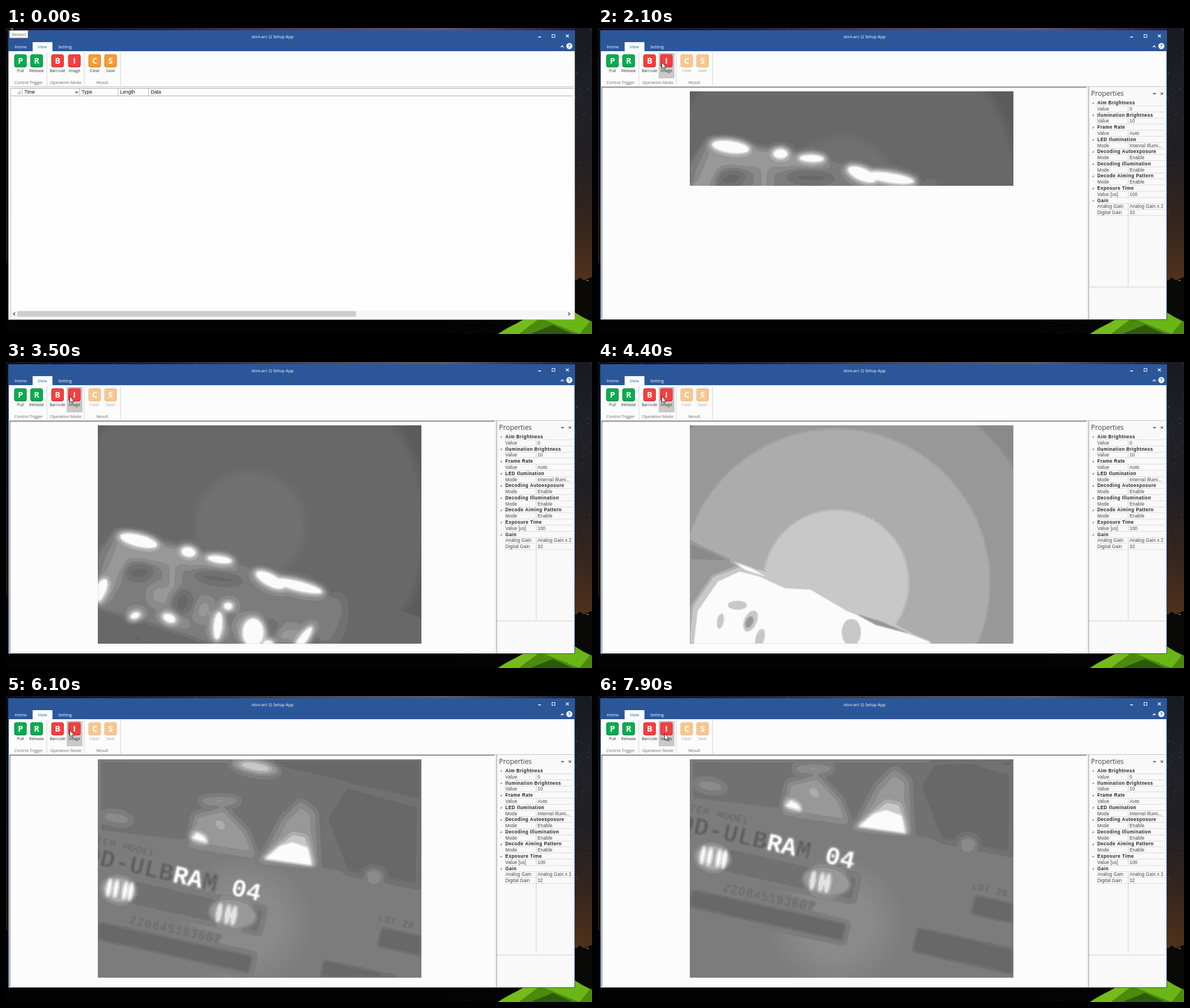
Animation of 1034 by 541 pixels, one loop 8000 ms. Source, as an HTML page with a canvas:

```html
<!DOCTYPE html>
<html lang="en">
<head>
<meta charset="utf-8">
<title>Camera setup</title>
<style>
html, body { margin: 0; width: 100%; height: 100%; overflow: hidden; background: #000; }
canvas { display: block; width: 1034px; height: 541px; }
</style>
</head>
<body>
<canvas id="stage" width="1034" height="541"></canvas>
<script>
const LOOP = 8000;
const UI = '"Open Sans", "Noto Sans", sans-serif';
const ARIAL = '"Liberation Sans", Arial, sans-serif';
const MONO = '"Liberation Mono", "DejaVu Sans Mono", monospace';
const BLUE = '#2b579a';
const VIEW = { x: 162, y: 112, w: 571, h: 386 };

const makeCanvas = (w, h) => Object.assign(document.createElement('canvas'), { width: w, height: h });
const c = document.getElementById('stage').getContext('2d');
const grey = v => `rgb(${v},${v},${v})`;

/* ---------- helpers ---------- */

function random(seed) {
  return () => (seed = (seed * 16807) % 2147483647) / 2147483647;
}

// Point at time t on straight legs between [time, x, y] keys.
function along(keys, t) {
  const n = keys.findIndex(k => k[0] > t);
  if (n === 0) return keys[0].slice(1);
  if (n < 0) return keys[keys.length - 1].slice(1);
  const [t0, x0, y0] = keys[n - 1], [t1, x1, y1] = keys[n];
  const k = (t - t0) / (t1 - t0);
  return [x0 + (x1 - x0) * k, y0 + (y1 - y0) * k];
}

function rect(x, y, w, h, color) {
  c.fillStyle = color;
  c.fillRect(x, y, w, h);
}

function rounded(x, y, w, h, r, color) {
  c.beginPath();
  c.roundRect(x, y, w, h, r);
  c.fillStyle = color;
  c.fill();
}

function text(s, x, y, size, color, font = UI, align = 'left', weight = '', gap = 0) {
  c.font = `${weight} ${size}px ${font}`;
  c.fillStyle = color;
  c.textAlign = align;
  c.letterSpacing = gap + 'px';
  c.fillText(s, x, y);
}

function trace(points) {
  c.beginPath();
  points.forEach(([x, y]) => c.lineTo(x, y));
}

function fill(points, color) {
  trace(points);
  c.fillStyle = color;
  c.fill();
}

function line(points, color, width = 1) {
  trace(points);
  c.strokeStyle = color;
  c.lineWidth = width;
  c.stroke();
}

function cross(x, y, r, color) {
  line([[x - r, y - r], [x + r, y + r]], color, 1.1);
  line([[x + r, y - r], [x - r, y + r]], color, 1.1);
}

function ramp(x, y, colors) {
  const r = c.createLinearGradient(0, 0, x, y);
  colors.forEach((color, i) => r.addColorStop(i / (colors.length - 1), color));
  return r;
}

/* ---------- desktop behind the window ---------- */

function drawDesktop() {
  const rnd = random(41);
  rect(0, 0, 1034, 541, '#030303');
  rect(0, 0, 1034, 5, ramp(1034, 0, ['#0b0e15', '#20232c', '#484856', '#5c5b69', '#15181f']));
  rect(0, 5, 4, 410, ramp(0, 415, ['#0b0e15', '#15151b', '#21160f']));
  rect(1004, 0, 30, 446, ramp(0, 446, ['#171a21', '#1f2026', '#211f23', '#33241d', '#51311a']));
  for (let i = 0; i < 160; i++) {
    const side = i % 2;
    rect(side ? 1004 + rnd() * 30 : rnd() * 1034, rnd() * (side ? 330 : 4), 1, 1, grey(50 + rnd() * 70 | 0));
  }

  fill([[1004, 449], [1012, 441], [1020, 446], [1034, 440], [1034, 541], [1004, 541]], '#0a0906');
  line([[1024, 445], [1026, 447], [1028, 446]], '#c8c8c0');
  for (let i = 0; i < 60; i++) rect(783 + rnd() * 100, 517 + rnd() * 24, 2, 1, '#111808');

  c.beginPath();
  c.moveTo(868, 541);
  c.quadraticCurveTo(900, 517, 950, 509);
  c.quadraticCurveTo(990, 496, 1034, 519);
  c.lineTo(1034, 541);
  c.fillStyle = ramp(0, 541, ['#4c8a0c', '#4c8a0c']);
  c.fill();
  fill([[868, 541], [912, 516], [938, 516], [905, 541]], '#76bb1c');
  fill([[950, 516], [1004, 503], [1030, 519], [1012, 541]], '#6cb517');
  fill([[925, 541], [965, 525], [1000, 541]], '#2d5a08');
}

/* ---------- window ---------- */

function ribbonButton(letter, label, x, color, edge, ink = '#333') {
  rounded(x - 11, 46.5, 22, 23, 4, edge);
  rounded(x - 10, 47.2, 20, 20.8, 3.5, color);
  text(letter, x, 62.8, 14.5, '#fff', UI, 'center', 'bold');
  text(label, x, 77.5, 7.2, ink, UI, 'center');
}

function drawWindow(imageMode, pressed) {
  rect(4, 4, 1000, 512, pressed ? BLUE : '#b4b4b4');
  rect(5, 41, 998, 474, '#f6f6f6');
  rect(4, 4, 1000, 37, BLUE);
  text('dovi-arc Q Setup App', 470.5, 17.5, 7.6, '#fff', UI, 'center');
  rect(939, 15, 5, 1.5, '#fff');
  c.strokeStyle = '#fff';
  c.lineWidth = 1;
  c.strokeRect(963.5, 11.5, 5, 5);
  cross(990.5, 14, 2.5, '#fff');
  line([[979, 34], [981.5, 31.5], [984, 34]], '#fff', 1.4);
  rounded(988.6, 26.6, 10.8, 10.8, 5.4, '#fff');
  text('?', 994, 35, 8.5, BLUE, UI, 'center', 'bold');

  rect(47, 25, 35, 17, '#fcfcfc');
  text('Home', 15.5, 36, 7.5, '#fff');
  text('View', 56, 36, 7.5, '#2464b4');
  text('Setting', 92, 36, 7.5, '#fff');

  rect(6, 41, 996, 62, '#fcfcfc');
  rect(6, 103, 996, 1, '#c4c4c4');
  for (const x of [72, 138, 202]) rect(x - .5, 43, 1, 59, '#d2d2d2');
  if (pressed) rect(107, 44, 28, 45, '#c9c9c9');
  const green = ['#02ad50', '#058442'], red = ['#fb3c3e', '#c83032'];
  const orange = imageMode ? ['#f8c68f', '#e9bb88', '#a5a5a5'] : ['#fd9a2b', '#cf8025'];
  ribbonButton('P', 'Pull', 25.5, ...green);
  ribbonButton('R', 'Release', 54, ...green);
  ribbonButton('B', 'Barcode', 91, ...red);
  ribbonButton('I', 'Image', 120.7, ...red);
  ribbonButton('C', 'Clear', 156.5, ...orange);
  ribbonButton('S', 'Save', 184.5, ...orange);
  text('Control Trigger', 40, 98.5, 7.2, '#666', UI, 'center');
  text('Operation Mode', 105.5, 98.5, 7.2, '#666', UI, 'center');
  text('Result', 170, 98.5, 7.2, '#666', UI, 'center');
}

function drawTable() {
  rect(8, 106, 993, 406, '#fdfdfd');
  rect(8, 106, 993, 1, '#a6a6a6');
  rect(8, 106, 1, 405, '#c8c8c8');
  rect(8, 119.5, 992, 1, '#a9a9a9');
  const columns = { Time: 28, Type: 129, Length: 197, Data: 251 };
  for (const [name, x] of Object.entries(columns)) {
    rect(x, 107, 1, 13, '#bdbdbd');
    text(name, x + 4.5, 116, 8.5, '#111', ARIAL);
  }
  fill([[26, 110], [26, 117], [19, 117]], '#c6c6c6');
  fill([[121, 112.5], [128, 112.5], [124.5, 116]], '#707070');
  rect(9, 500, 991, 11, '#f5f5f5');
  rect(20, 500.5, 597.5, 10, '#cdcdcd');
  line([[16, 503], [13, 505.5], [16, 508]], '#444', 1.3);
  line([[992, 503], [995, 505.5], [992, 508]], '#444', 1.3);
}

const PROPERTIES = [
  'Aim Brightness', 'Value|0', 'Ilumination Brightness', 'Value|10',
  'Frame Rate', 'Value|Auto', 'LED Ilumination', 'Mode|Internal Illumi...',
  'Decoding Autoexposure', 'Mode|Enable', 'Decoding Illumination', 'Mode|Enable',
  'Decode Aiming Pattern', 'Mode|Enable', 'Exposure Time', 'Value [us]|100',
  'Gain', 'Analog Gain|Analog Gain x 2', 'Digital Gain|32'
];

function drawImageMode() {
  rect(6, 104, 857, 411, '#fcfcfc');
  rect(6, 104, 856, 1.5, '#858585');
  rect(6, 104, 1.5, 410, '#858585');
  rect(862, 104, 4, 411, '#f2f2f2');
  rect(865, 104, 1.5, 411, '#b5b5b5');
  rect(867, 104, 135, 411, '#f9f9f9');
  text('Properties', 870, 120, 12, '#444');
  fill([[979, 115], [985, 115], [982, 118]], '#555');
  cross(995, 116, 2.2, '#555');

  rect(935, 332, 1, 123, '#d0d0d0');
  rect(867, 457.5, 135, 1, '#cfcfcf');
  PROPERTIES.forEach((row, i) => {
    const y = 132 + i * 10.79, [name, value] = row.split('|');
    rect(880, Math.round(y + 5), 121, 1, '#dcdcdc');
    if (value) {
      rect(935, y - 5, 1, 10, '#d0d0d0');
      text(name, 881, y + 3, 8.2, '#444', ARIAL, 'left', '', .1);
      text(value, 938, y + 3, 8.2, '#444', ARIAL, 'left', '', .1);
    } else {
      fill([[875, y - 1.5], [875, y + 2], [871.5, y + 2]], '#8a8a8a');
      text(name, 881, y + 3, 8.2, '#222', ARIAL, 'left', 'bold', .45);
    }
  });
}

/* ---------- camera picture ---------- */

const TONES = [92, 104, 113, 124, 138, 152, 172, 200, 226, 251];
const nearest = Array.from({ length: 256 }, (_, v) =>
  TONES.reduce((a, b) => Math.abs(b - v) < Math.abs(a - v) ? b : a));

const pic = makeCanvas(VIEW.w, VIEW.h).getContext('2d', { willReadFrequently: true });
const ink = makeCanvas(VIEW.w, VIEW.h).getContext('2d', { willReadFrequently: true });

// Draws on a clear sheet moved and tilted by the pose, then lays it down blurred.
function layer(blur, { dx, dy, tilt }, draw) {
  ink.setTransform(1, 0, 0, 1, 0, 0);
  ink.clearRect(0, 0, VIEW.w, VIEW.h);
  ink.setTransform(1, tilt, 0, 1, dx - VIEW.x, dy - VIEW.y - 560 * tilt);
  draw();
  pic.filter = `blur(${blur}px)`;
  pic.drawImage(ink.canvas, 0, 0);
  pic.filter = 'none';
}

function glow(x, y, inner, outer) {
  const r = pic.createRadialGradient(x - VIEW.x, y - VIEW.y, 0, x - VIEW.x, y - VIEW.y, 430);
  r.addColorStop(0, grey(inner));
  r.addColorStop(1, grey(outer));
  pic.fillStyle = r;
  pic.fillRect(0, 0, VIEW.w, VIEW.h);
}

function blob(x, y, rx, ry, deg, v) {
  ink.beginPath();
  ink.ellipse(x, y, rx, ry, deg * Math.PI / 180, 0, 7);
  ink.fillStyle = grey(v);
  ink.fill();
}

function patch(v, ...points) {
  ink.beginPath();
  points.forEach(([x, y]) => ink.lineTo(x, y));
  ink.fillStyle = grey(v);
  ink.fill();
}

function slanted(x, y, draw) {
  ink.save();
  ink.translate(x, y);
  ink.rotate(.22);
  draw();
  ink.restore();
}

function lettering(s, x, y, size, v, bright = []) {
  slanted(x, y, () => {
    ink.font = `bold ${size}px ${MONO}`;
    ink.textAlign = 'center';
    [...s].forEach((ch, i) => {
      ink.fillStyle = grey(bright.includes(i) ? 255 : v);
      ink.fillText(ch, i * size * .6, size * .34);
    });
  });
}

const strip = (x, y, w, h, v) => slanted(x, y, () => {
  ink.fillStyle = grey(v);
  ink.fillRect(0, 0, w, h);
});

const MODEL = 'QD-ULBRAM 04';
const ridge = x => 242 + (x - 200) * .295;

// Highlights on the bag: x, depth below the ridge, radii and angle.
const SHINES = [
  [234, 9, 32, 9, 14], [322, 3, 11, 7, 10], [377, 0, 20, 5, 8], [466, 10, 26, 9, 28], [515, 6, 42, 7, 14],
  [166, 118, 8, 22, 25], [374, 118, 6, 23, 5], [392, 78, 6, 5, 0],
  [436, 112, 17, 24, 0], [462, 136, 14, 17, 0], [470, 148, 24, 6, 14],
  [521, 103, 30, 6, -55], [288, 130, 10, 6, 25], [228, 143, 7, 4, -20]
];

function shine(grow, v) {
  for (const [x, depth, rx, ry, deg] of SHINES) blob(x, ridge(x) + depth, rx + grow, ry + grow * .8, deg, v);
}

function bagScene(pose) {
  glow(430, 290, 113, 93);
  layer(2, pose, () => {
    patch(100, [163, 213], [240, 240], [163, 252]);
    patch(103, [560, 346], [740, 400], [740, 700], [160, 700], [160, 370]);
  });
  layer(6, pose, () => {
    blob(580, 400, 22, 50, 10, 118);
    patch(130, [130, 330], [195, 238], [240, ridge(240)], [560, ridge(560)], [588, 380],
      [560, 445], [500, 488], [230, 398], [130, 370]);
    patch(152, [163, 340], [203, 246], [400, 298], [410, 312], [300, 305], [215, 295], [190, 345], [163, 375]);
    patch(148, [282, 290], [305, 290], [302, 360], [320, 415], [285, 400]);
    const rnd = random(7);
    for (let i = 0; i < 9; i++) {
      const x = 235 + i * 38;
      blob(x, ridge(x) + 65 + rnd() * 40, 12 + rnd() * 16, 14 + rnd() * 16, rnd() * 60 - 20, i % 2 ? 148 : 108);
    }
    blob(375, 328, 46, 15, 8, 108);
  });
  layer(5, pose, () => shine(9, 172));
  layer(3, pose, () => shine(4, 212));
  layer(1.8, pose, () => shine(1, 255));
  layer(2.5, pose, () => {
    lettering('ITEM MODEL', 195, 428, 20, 96);
    lettering(MODEL, 196, 457, 44, 90);
    strip(180, 487, 330, 44, 96);
  });
}

function floodScene() {
  const still = { dx: 0, dy: 0, tilt: 0 };
  const slope = (x, lift) => [x, 375 - lift + (x - 262) * .37];
  const heap = (v, g) => patch(v, [168 - g, 510], [176 - g, 440 - g], [212 - g, 388 - g],
    slope(250, g), slope(285, g + 4), slope(330, g), slope(375, g + 14), slope(440, g), slope(586 + g, 0), [586 + g, 510]);
  glow(420, 390, 208, 136);
  layer(2.5, still, () => {
    patch(140, [160, 318], [235, 350], [225, 356], [160, 352]);
    patch(158, [160, 350], [230, 352], [330, 395], [215, 384], [160, 440]);
    heap(200, 9);
  });
  layer(1.2, still, () => {
    heap(255, 0);
    patch(250, [239, 353], [270, 364], [298, 380], [260, 368]);
    patch(152, [452, 444], [500, 459], [551, 481], [490, 465]);
    blob(246, 430, 17, 8, 0, 200);
    blob(269, 458, 11, 20, 25, 200);
    blob(267, 460, 6, 11, 25, 152);
    blob(216, 458, 6, 14, 10, 200);
    blob(447, 478, 17, 24, 0, 200);
    blob(286, 488, 8, 17, 15, 200);
  });
}

function labelScene(pose) {
  glow(420, 400, 133, 126);
  layer(5, pose, () => {
    patch(117, [100, -60], [760, -60], [760, 349], [540, 305], [400, 270], [100, 235]);
    patch(103, [480, 124], [300, -60], [760, -60], [760, 190], [600, 152]);
    patch(108, [560, 215], [600, 155], [760, 200], [760, 349], [600, 318]);
    blob(440, 125, 42, 13, 10, 158);
    patch(148, [322, 262], [333, 210], [385, 198], [425, 240], [440, 280]);
    patch(146, [450, 290], [490, 215], [520, 186], [545, 205], [550, 300]);
    blob(377, 186, 34, 7, 0, 150);
    blob(195, 216, 26, 10, 10, 138);
    blob(650, 318, 16, 12, 10, 140);
  });
  layer(3.5, pose, () => {
    strip(225, 326, 235, 42, 112);
    strip(163, 398, 280, 33, 104);
    strip(662, 408, 80, 36, 103);
    strip(560, 465, 200, 46, 104);
    blob(378, 228, 12, 8, 45, 172);
    patch(190, [450, 288], [482, 260], [505, 240], [532, 246], [546, 301]);
    blob(341, 250, 17, 11, 20, 190);
    blob(440, 125, 28, 7, 10, 205);
    blob(200, 343, 30, 22, 10, 175);
    blob(400, 385, 42, 24, 10, 158);
  });
  layer(2, pose, () => {
    patch(255, [456, 288], [483, 265], [505, 258], [533, 268], [540, 300]);
    patch(250, [327, 252], [337, 241], [350, 248], [357, 261]);
    for (const x of [182, 194, 210, 220]) blob(x, 342 + (x - 200) * .2, 4.5, 17, 10, 250);
    for (const x of [376, 391, 402]) blob(x, 386 + (x - 390) * .2, 5, 18, 10, 235);
  });
  layer(1.6, pose, () => {
    lettering('ITEM MODEL', 153, 253, 20, 106);
    lettering(MODEL, 154, 282, 44, 96, [6, 7, 10, 11]);
    lettering('220845193607', 224, 396, 23, 106);
    lettering('LOT 28', 662, 393, 18, 102);
  });
}

// Moments at which the camera picture refreshes, and how the bag travels under it.
const REFRESH = [2100, 2200, 2500, 2800, 3200, 3500, 3600, 3900, 4400, 4700,
  5000, 5400, 5500, 5800, 6100, 6500, 6900, 7100, 7300, 7600, 7900];
const TRAVEL = [[2100, 0, -80], [3500, 0, 55], [4400, 0, 75], [5000, 0, 0], [6100, -42, -175], [7900, -39, -232]];
const prints = [];

function print(i) {
  if (prints[i]) return prints[i];
  const t = REFRESH[i], [dx, dy] = along(TRAVEL, t);
  const tilt = -.09 * Math.max(0, 1 - (t - 2100) / 700);
  if (t >= 5800) labelScene({ dx: dx + 42, dy: dy + 175, tilt: 0 });
  else if (t === 4400) floodScene();
  else bagScene({ dx, dy, tilt });

  const img = pic.getImageData(0, 0, VIEW.w, VIEW.h), d = img.data;
  for (let k = 0; k < d.length; k += 4) d[k] = d[k + 1] = d[k + 2] = nearest[d[k]];
  const out = makeCanvas(VIEW.w, VIEW.h);
  out.getContext('2d').putImageData(img, 0, 0);
  return prints[i] = out;
}

function drawCamera(t) {
  const i = REFRESH.findLastIndex(time => time <= t);
  if (i < 0) return;
  const h = i ? VIEW.h : 167; // the first picture arrives only in part
  c.drawImage(print(i), 0, 0, VIEW.w, h, VIEW.x, VIEW.y, VIEW.w, h);
}

/* ---------- pointer ---------- */

const TRACK = [[100, 6, -10], [700, 150, 232], [800, 150, 232], [1100, 107, 105],
  [1200, 107, 105], [1300, 112, 60], [6800, 112, 60], [7300, 117, 66]];
const ARROW = [[.5, .5], [.5, 12], [3, 9.6], [4.8, 13.6], [6.6, 12.8], [4.9, 9], [8.3, 9], [.5, .5]];

function drawPointer(t) {
  const [x, y] = along(TRACK, Math.floor(t / 100) * 100).map(Math.round);
  c.save();
  c.translate(x, y);
  fill(ARROW, '#fff');
  line(ARROW, '#222', .9);
  c.restore();
}

/* ---------- playback ---------- */

function draw(t) {
  const imageMode = t >= 1400;
  c.drawImage(desktop, 0, 0);
  drawWindow(imageMode, t >= 1300);
  if (imageMode) {
    drawImageMode();
    drawCamera(t);
  } else {
    drawTable();
  }
  drawPointer(t);
  if (t < 200) {
    rect(6, 4, 33, 14, '#8a8a8a');
    rect(6.7, 4.7, 31.6, 12.6, '#fff');
    text('Restart', 10.5, 13.5, 7.4, '#666');
  }
}

drawDesktop();
const desktop = makeCanvas(1034, 541);
desktop.getContext('2d').drawImage(c.canvas, 0, 0);

const start = performance.now();
let ready = 0;
function tick() {
  draw((performance.now() - start) % LOOP);
  if (ready < REFRESH.length) print(ready++);
  requestAnimationFrame(tick);
}
tick();
</script>
</body>
</html>
```
